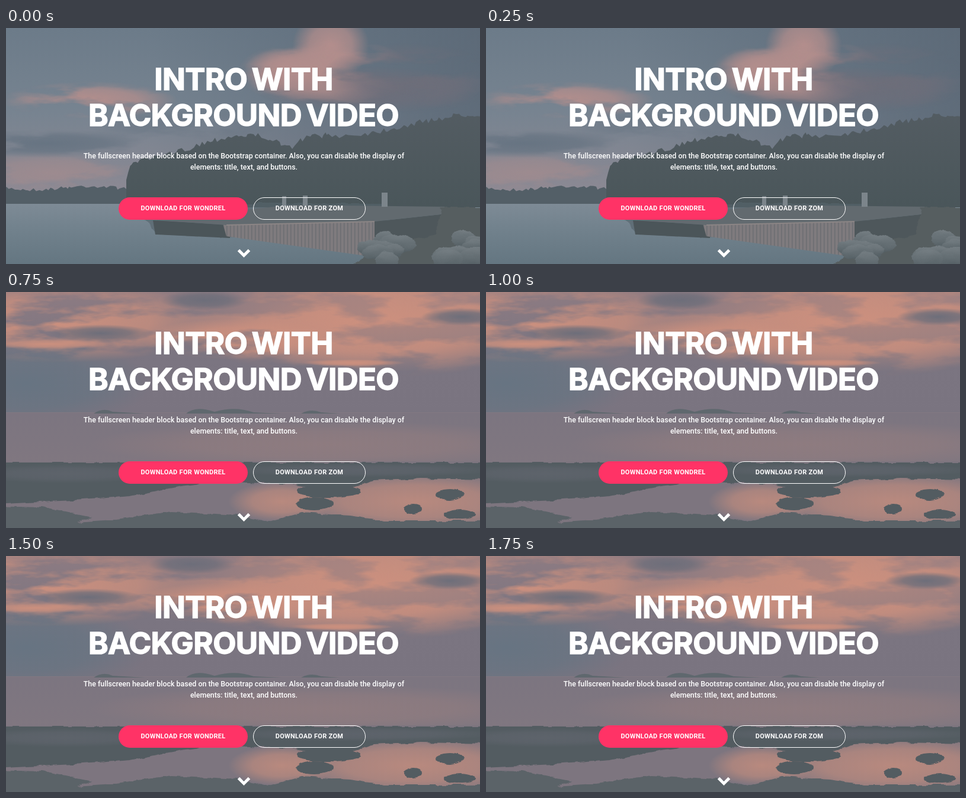
An HTML page that plays this animation: 800 px wide and 400 px high, repeating every 2000 ms.

```html
<!DOCTYPE html>
<html lang="en">
<head>
<meta charset="utf-8">
<title>Intro with background video</title>
<style>
  html, body { margin: 0; width: 100%; height: 100%; overflow: hidden; }
  svg { display: block; width: 800px; height: 400px; }
  text { fill: #fff; text-anchor: middle; font-family: Roboto, sans-serif; }
  .title { font: 700 51px Inter, sans-serif; letter-spacing: -.6px; word-spacing: -4px; stroke: #fff; stroke-width: 1.5; }
  .lead { font-size: 12.4px; font-weight: 500; }
  .label { font-size: 11px; font-weight: 700; letter-spacing: .3px; }
  .pink { fill: url(#pink); }
  .orange { fill: url(#orange); }
  .dim { fill: url(#dim); }
  .blue { fill: url(#blue); }
</style>
</head>
<body>
<svg viewBox="0 0 800 400">
  <defs>
    <linearGradient id="dusk" x2="0" y2="1">
      <stop offset="0" stop-color="#6c7b89"/><stop offset=".45" stop-color="#768390"/>
      <stop offset="1" stop-color="#8f8a94"/>
    </linearGradient>
    <linearGradient id="shade">
      <stop offset=".3" stop-color="#566574" stop-opacity="0"/><stop offset="1" stop-color="#596674" stop-opacity=".8"/>
    </linearGradient>
    <linearGradient id="lake" x2="0" y2="1">
      <stop offset="0" stop-color="#7e8b96"/><stop offset=".4" stop-color="#72828d"/><stop offset="1" stop-color="#647681"/>
    </linearGradient>
    <linearGradient id="hill" x2="0" y2="1">
      <stop offset="0" stop-color="#535c62"/><stop offset="1" stop-color="#4a565a"/>
    </linearGradient>
    <linearGradient id="boulder" x2="0" y2="1">
      <stop offset="0" stop-color="#747d82"/><stop offset="1" stop-color="#535e63"/>
    </linearGradient>
    <linearGradient id="glow" x2="0" y2="1">
      <stop offset="0" stop-color="#8d7b82"/><stop offset=".5" stop-color="#7b7581"/><stop offset="1" stop-color="#7a7480"/>
    </linearGradient>
    <linearGradient id="sea" x2="0" y2="1">
      <stop offset="0" stop-color="#7c7580"/><stop offset="1" stop-color="#807780"/>
    </linearGradient>
    <pattern id="planks" width="6" height="80" patternUnits="userSpaceOnUse">
      <path d="M0 0h6v80H0z" fill="#7f7b7e"/><path d="M0 0h1.5v80H0z" fill="#6b6d71"/>
    </pattern>
    <g id="softFills"/>
    <!-- Soft shapes broken up by noise -->
    <filter id="cloud" filterUnits="userSpaceOnUse" x="-80" y="-80" width="980" height="480" color-interpolation-filters="sRGB">
      <feTurbulence type="fractalNoise" baseFrequency=".007 .024" numOctaves="5" seed="12"/>
      <feColorMatrix values="1 0 0 0 0  0 1 0 0 0  0 0 1 0 0  0 0 0 5 -1.8" result="n"/>
      <feComposite in="SourceGraphic" in2="n" operator="in"/>
    </filter>
    <filter id="rough" filterUnits="userSpaceOnUse" x="-40" y="180" width="880" height="260" color-interpolation-filters="sRGB">
      <feTurbulence type="fractalNoise" baseFrequency=".04 .09" numOctaves="3" seed="9"/>
      <feDisplacementMap in="SourceGraphic" in2="" scale="8" xChannelSelector="R" yChannelSelector="G" result="d"/>
      <feTurbulence type="fractalNoise" baseFrequency=".04 .09" numOctaves="3" seed="9" result="n"/>
      <feDisplacementMap in="SourceGraphic" in2="n" scale="8" xChannelSelector="R" yChannelSelector="G"/>
    </filter>
  </defs>

  <g id="lakeScene">
    <path d="M0 0h800v300H0z" fill="url(#dusk)"/>
    <path d="M0 0h800v300H0z" fill="url(#shade)"/>
    <g id="farClouds"><g filter="url(#cloud)">
      <ellipse class="pink" cx="140" cy="122" rx="150" ry="32"/>
      <ellipse class="pink" cx="80" cy="245" rx="180" ry="36" opacity=".5"/>
      <ellipse class="blue" cx="70" cy="196" rx="180" ry="24"/>
      <ellipse class="blue" cx="300" cy="165" rx="160" ry="30" opacity=".6"/>
    </g></g>
    <g id="nearClouds">
      <ellipse class="pink" cx="548" cy="30" rx="65" ry="60"/>
      <ellipse class="pink" cx="475" cy="75" rx="75" ry="42"/>
      <ellipse class="dim" cx="610" cy="105" rx="190" ry="40"/>
      <g filter="url(#cloud)">
        <ellipse class="pink" cx="540" cy="75" rx="150" ry="60"/>
        <ellipse class="dim" cx="680" cy="85" rx="150" ry="60"/>
      </g>
    </g>
    <path d="M0 297h800v103H0z" fill="url(#lake)"/>
    <path id="farShore" fill="#535f67"/>
    <path id="forest" fill="url(#hill)"/>
    <path d="M215 297H640V345L420 356 255 350 235 325Z" fill="#56646c" opacity=".65" filter="url(#rough)"/>
    <path d="M248 326 380 334 378 356 252 350Z" fill="#4b5559"/>
    <path d="M366 332 622 327 622 378 606 386 372 353Z" fill="url(#planks)"/>
    <path d="M248 325 480 300 745 303 742 315 622 328 372 334Z" fill="#626a6f"/>
    <path d="M372 334 622 328" stroke="#8b8585" stroke-width="2"/>
    <path d="M622 328 742 315 738 355 622 378Z" fill="#4e575b"/>
    <path d="M634 279h10v24h-10zM466 285h7v17h-7zM501 284h8v17h-8z" fill="#7c858b"/>
    <g filter="url(#rough)">
      <path d="M735 304H820V420H560L625 372 725 350Z" fill="#565e60"/>
      <g id="boulders"/>
    </g>
  </g>

  <g id="shoreScene">
    <path d="M0 0h800v210H0z" fill="url(#glow)"/>
    <ellipse class="blue" cx="35" cy="155" rx="210" ry="75"/>
    <g id="sunsetClouds">
      <ellipse class="orange" cx="640" cy="50" rx="330" ry="85" opacity=".55"/>
      <g filter="url(#cloud)">
        <ellipse class="orange" cx="620" cy="50" rx="340" ry="95"/>
        <ellipse class="orange" cx="80" cy="50" rx="300" ry="70"/>
        <ellipse class="orange" cx="390" cy="80" rx="160" ry="35"/>
      </g>
      <ellipse class="orange" cx="70" cy="88" rx="110" ry="9"/>
      <ellipse class="orange" cx="585" cy="120" rx="90" ry="6"/>
      <ellipse class="dim" cx="335" cy="14" rx="75" ry="17"/>
      <ellipse class="dim" cx="160" cy="70" rx="90" ry="15"/>
      <ellipse class="dim" cx="770" cy="42" rx="70" ry="15"/>
    </g>
    <path d="M0 204h800v90H0z" fill="url(#sea)"/>
    <path d="M0 204.5H800" stroke="#837982"/>
    <path d="M148 206q16-11 32-3l55 3zM304 206q16-14 48-3 34-10 66 1l48 2zM498 206q16-9 34-2l32 2z" fill="#5f686e"/>
    <ellipse class="orange" cx="540" cy="258" rx="400" ry="40" opacity=".2"/>
    <path d="M0 287h800v113H0z" fill="#7d757f"/>
    <ellipse class="orange" cx="690" cy="355" rx="220" ry="50" opacity=".75"/>
    <ellipse class="orange" cx="465" cy="355" rx="90" ry="34" opacity=".75"/>
    <g filter="url(#rough)" fill="#535c61">
      <path d="M-20 289H820V318L700 316 620 320 560 338 480 326 360 321 295 329 210 346 130 352-20 360Z"/>
      <path d="M-20 363 60 365 145 382 120 390 180 386 280 372 390 378 440 390 500 374 580 379 640 388 820 388V420H-20Z" fill="#5b6368"/>
      <ellipse cx="545" cy="337" rx="54" ry="11"/>
      <ellipse cx="521" cy="359" rx="32" ry="12"/>
      <ellipse cx="687" cy="368" rx="15" ry="8"/>
      <ellipse cx="749" cy="344" rx="24" ry="10"/>
      <ellipse cx="766" cy="377" rx="26" ry="8"/>
    </g>
    <ellipse class="dim" cx="100" cy="308" rx="170" ry="16" opacity=".4"/>
    <ellipse class="dim" cx="600" cy="302" rx="230" ry="12" opacity=".4"/>
  </g>

  <text class="title" x="401" y="105">INTRO WITH</text>
  <text class="title" x="401" y="165.5">BACKGROUND VIDEO</text>
  <text class="lead" x="401.5" y="221">The fullscreen header block based on the Bootstrap container. Also, you can disable the display of</text>
  <text class="lead" x="401.5" y="240">elements: title, text, and buttons.</text>
  <rect x="190" y="287" width="218" height="38" rx="19" fill="#ff3366"/>
  <text class="label" x="299" y="309">DOWNLOAD FOR WONDREL</text>
  <rect x="417.5" y="287.5" width="189" height="37" rx="18.5" fill="none" stroke="#fff"/>
  <text class="label" x="512" y="309">DOWNLOAD FOR ZOM</text>
  <path d="M392.5 376.5 401.5 385.5 410.5 376.5" fill="none" stroke="#fff" stroke-width="5"/>
</svg>
<script>
const $ = id => document.getElementById(id);

let seed = 7;
const rand = () => (seed = seed * 16807 % 2147483647) / 2147483647;

// Radial fills that fade out towards the rim
const soft = { pink: '#b38e8c', orange: '#cc907e', dim: '#6d6e7a', blue: '#677482' };
$('softFills').innerHTML = Object.entries(soft).map(([id, color]) =>
  `<radialGradient id="${id}"><stop stop-color="${color}"/><stop offset=".55" stop-color="${color}" stop-opacity=".75"/>
   <stop offset="1" stop-color="${color}" stop-opacity="0"/></radialGradient>`).join('');

// Jagged treetops along a ridge, closed at the base line
function trees(id, from, to, base, height, ridge) {
  let d = `M${from} ${base}`;
  for (let x = from; x < to; x += 2 + rand() * 5) d += `L${x} ${ridge(x) + (rand() - .5) * height}`;
  $(id).setAttribute('d', d + `L${to} ${ridge(to)}V${base}Z`);
}

function ease(x, a, b) {
  const t = Math.min(1, Math.max(0, (x - a) / (b - a)));
  return t * t * (3 - 2 * t);
}

trees('farShore', -5, 215, 298, 6, x => 271 + 3 * Math.sin(x / 30));
trees('forest', 203, 806, 304, 10, x =>
  255 - 30 * ease(x, 203, 215) - 43 * ease(x, 215, 400) - 36 * ease(x, 560, 800) + 20 * Math.exp(-(((x - 475) / 25) ** 2)));

for (let i = 0; i < 14; i++) {
  const x = 610 + rand() * 190, y = 358 + i * 2.8;
  $('boulders').innerHTML +=
    `<ellipse cx="${x}" cy="${y}" rx="${18 + rand() * 14}" ry="${10 + rand() * 7}" fill="url(#boulder)"/>`;
}

const shift = (id, x) => $(id).setAttribute('transform', `translate(${x} 0)`);

let shown = -1;
function draw() {
  const step = Math.floor(performance.now() % 2000 / 250);
  if (step !== shown) {
    shown = step;
    const atLake = step < 3;
    $('lakeScene').style.display = atLake ? '' : 'none';
    $('shoreScene').style.display = atLake ? 'none' : '';
    shift('farClouds', -6 * step);
    shift('nearClouds', -12 * step);
    shift('sunsetClouds', -7 * (step - 3));
  }
  requestAnimationFrame(draw);
}
draw();
</script>
</body>
</html>
```
